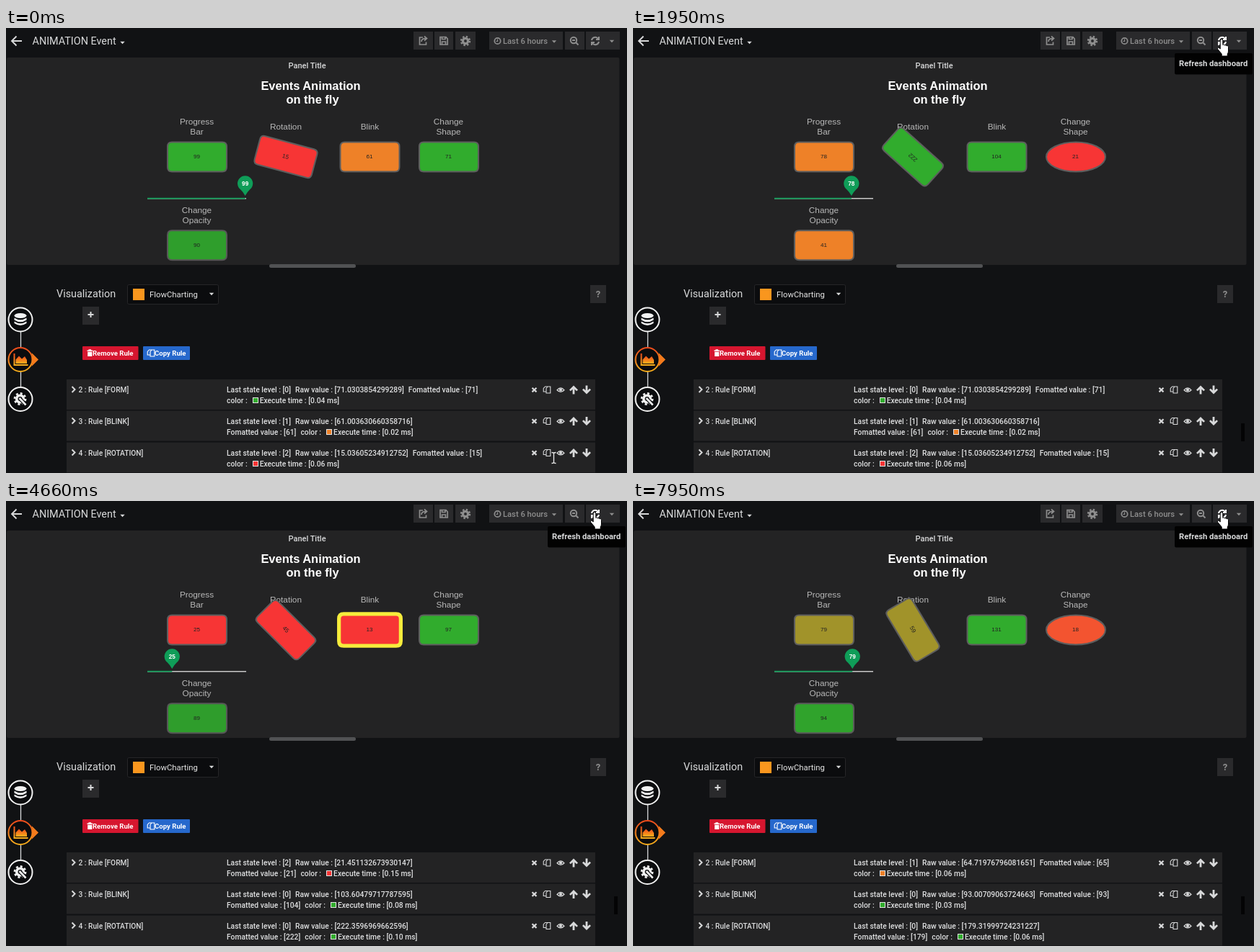
Write an HTML page that moves like this. It is 861 px wide and 618 px high and loops after 8 s.

```html
<!DOCTYPE html>
<html lang="en">
<head>
<meta charset="utf-8">
<title>Events animation</title>
<style>
html, body { margin: 0; width: 861px; height: 618px; overflow: hidden; background: #111214; }
svg { position: absolute; left: 0; top: 0; font-family: Roboto, sans-serif; fill: #d8d9da; }
.btn { fill: #2a2a2c; }
.dim { fill: #8e8e8e; }
.line { fill: none; stroke: #d8d9da; }
.dimline { fill: none; stroke: #8e8e8e; stroke-width: 1.7; }
.mid { text-anchor: middle; }
.flow { font-family: "Liberation Sans", Arial, sans-serif; text-anchor: middle; }
.shape { stroke: #5e5e5e; stroke-width: 2; stroke-linejoin: round; }
.info { position: absolute; left: 306px; font: 500 10.3px/15px Roboto, sans-serif; color: #dedfe0; white-space: pre; }
.info span { margin-right: 6px; }
.info i { display: inline-block; width: 6px; height: 6px; border: 1px solid #e4e4e4; margin: 0 2px 0 1px; }
</style>
</head>
<body>
<svg id="page" width="861" height="618">
  <defs>
    <linearGradient id="hot" x2="0" y2="1">
      <stop stop-color="#ec4a1c"/><stop offset="1" stop-color="#fbb01c"/>
    </linearGradient>
    <path id="refresh" d="M-5-1A5 5 0 0 1 4-3M5 1A5 5 0 0 1-4 3M5-6V-2H1M-5 6V2H-1" fill="none" stroke-width="2"/>
    <path id="caret" d="M-3.2-1.7H3.2L0 1.7z"/>
    <path id="up" d="M0-6 6 0 4.2 1.8 1.4-.8V6H-1.4V-.8L-4.2 1.8-6 0z"/>
    <path id="copy" d="M-1-2 1-4.5H4.800V4.500H-1zM-1 2.500H-4.800V-2L-2.500-4.500H1" fill="none" stroke-width="1.100"/>
    <g id="tools">
      <path class="line" d="M-3-2.7 3 2.9M3-2.7-3 2.9" stroke-width="2.2" transform="translate(732.5 0)"/>
      <use href="#copy" x="750" stroke="#d8d9da"/>
      <path class="line" d="M764 .3Q769-5.6 774 .3 769 5.6 764 .3z" stroke-width="1.3"/>
      <circle cx="769" r="2.1"/>
      <use href="#up" x="787"/>
      <use href="#up" transform="translate(805 0) scale(1 -1)"/>
    </g>
  </defs>

  <!-- top bar -->
  <path class="line" d="M22 18H9M14.5 11.5 8 18 14.5 24.5" stroke-width="1.9"/>
  <text x="36.5" y="23" font-size="14.4">ANIMATION Event</text>
  <use href="#caret" x="161.5" y="20.5"/>
  <path class="btn" d="M565 5h27v25h-27zM594 5h26v25h-26zM623 5h28v25h-28zM670 5h102v25h-102zM775 5h27v25h-27zM804 5h47v25h-47z"/>
  <path class="dimline" d="M578 13H573.5V23H582.500V19.500M576 19Q576 14.500 582 14.500M580 11.500 583.5 14.500 580 17.500M602 12.500H610L612.200 15V23H602zM604.500 12.500V15.500H609V12.500M604.500 23V19H609.500V23"/>
  <circle class="dimline" cx="637" cy="18" r="3.6" style="stroke-width:3.2"/>
  <circle class="dimline" cx="637" cy="18" r="6" style="stroke-width:2.4" stroke-dasharray="2.4 2.312"/>
  <circle class="dimline" cx="681.5" cy="18" r="4.2"/>
  <path class="dimline" d="M681.500 15.500V18.500H679.500" style="stroke-width:1.2"/>
  <text class="dim" x="689" y="22" font-size="11.2" font-weight="500">Last 6 hours</text>
  <use href="#caret" class="dim" x="760" y="19"/>
  <circle class="dimline" cx="787" cy="17" r="4.2" style="stroke-width:2"/>
  <path class="dimline" d="M785 17H789M790 20 793.500 23.500" style="stroke-width:2"/>
  <use href="#refresh" id="reload" x="817" y="18"/>
  <use href="#caret" class="dim" x="840" y="18.500"/>

  <!-- panel -->
  <rect x="1" y="41" width="849.500" height="288" rx="2" fill="#232324"/>
  <rect x="365" y="328" width="120" height="5" rx="2.500" fill="#515254"/>
  <text class="mid" x="417.500" y="56" font-size="11" font-weight="500">Panel Title</text>
  <g class="flow">
    <g font-size="16.450" font-weight="700" fill="#fff">
      <text x="422.500" y="86">Events Animation</text><text x="425" y="105">on the fly</text>
    </g>
    <g font-size="11.800" fill="#b8b8b8">
      <text x="264.500" y="133.500">Progress</text><text x="264.500" y="147.500">Bar</text>
      <text x="388" y="140.500">Rotation</text><text x="504.500" y="140.500">Blink</text>
      <text x="613.500" y="133.500">Change</text><text x="613.500" y="147.500">Shape</text>
      <text x="264.500" y="256.500">Change</text><text x="264.500" y="270.500">Opacity</text>
    </g>
    <g id="boxes" font-size="8.100"></g>
    <path d="M196 236.700H333" stroke="#c9c9c9" stroke-width="1.600"/>
    <path id="bar" stroke="#0f9d58" stroke-width="1.800"/>
    <g id="pin">
      <path d="M0 233Q-2.500 228-6.500 224.200A10.600 10.600 0 1 1 6.500 224.200Q2.500 228 0 233z" fill="#0f9d58"/>
      <text y="219" font-size="8.200" font-weight="700" fill="#fff"></text>
    </g>
  </g>

  <!-- editor -->
  <text x="70" y="374" font-size="14.400">Visualization</text>
  <rect x="168.500" y="356.500" width="126" height="27" rx="2" fill="#0b0c0e" stroke="#262628"/>
  <rect x="176" y="362" width="16" height="16" fill="#f9961e"/>
  <text x="199" y="374" font-size="11.300" fill="#e6e6e6">FlowCharting</text>
  <use href="#caret" x="285" y="369.500"/>
  <path class="btn" d="M810 357h22v25h-22zM106 387h23v25h-23z"/>
  <text class="mid dim" x="821" y="374" font-size="13" font-weight="700">?</text>
  <path class="line" d="M113.500 398H121.500M117.500 394V402" stroke-width="2"/>

  <path class="line" d="M20.500 422V443M20.500 478V498" stroke="#fff" stroke-width="1.300"/>
  <g fill="#0b0c0e" stroke="#f2f2f2" stroke-width="2">
    <circle cx="20" cy="405" r="16.500"/><circle cx="20" cy="515.500" r="16.500"/>
    <circle cx="20" cy="460.500" r="16.500" stroke="url(#hot)"/>
  </g>
  <path d="M35.500 451 45 460.500 35.500 470Q38 460.500 35.500 451z" fill="#f47b1c"/>
  <g fill="#f2f2f2">
    <ellipse cx="20" cy="399.500" rx="8.500" ry="3.500"/>
    <path d="M11.500 402.500Q20 408 28.500 402.500V405.500Q20 411 11.500 405.500zM11.500 407.500Q20 413 28.500 407.500V410Q20 416 11.500 410z"/>
  </g>
  <path d="M11.500 452V468H30.500" fill="none" stroke="url(#hot)" stroke-width="2"/>
  <path d="M13.500 466V460.500L18 455.500 22 459.500 26 456 29 461V466z" fill="url(#hot)"/>
  <g fill="none" stroke="#f2f2f2">
    <circle cx="19.500" cy="515" r="4.800" stroke-width="3.600"/>
    <circle cx="19.500" cy="515" r="7.600" stroke-width="2.600" stroke-dasharray="3 2.969"/>
    <path d="M19.500 515 27.500 523.500" stroke="#0b0c0e" stroke-width="5"/>
    <path d="M18.500 514 27.500 523.500" stroke-width="2.600"/>
  </g>

  <rect x="106" y="442" width="77.500" height="19" rx="1" fill="#d6162f"/>
  <rect x="190" y="442" width="65" height="19" rx="1" fill="#2668cc"/>
  <g fill="#fff" font-size="9.600" font-weight="700">
    <path d="M112.500 447.500H120V449H112.500zM114.500 446.300H118V447.500H114.500zM113.200 449.800H119.300V456H113.200z"/>
    <text x="120" y="455">Remove Rule</text>
    <use href="#copy" x="201" y="451.500" stroke="#fff"/>
    <text x="206" y="455">Copy Rule</text>
  </g>
  <g id="rows" font-size="10.200" font-weight="500"></g>
  <rect id="thumb" x="843" y="549" width="5" height="25" fill="#040405"/>
</svg>
<div id="table"></div>

<svg width="861" height="618">
  <g id="tip">
    <rect x="751" y="35" width="108" height="29.500" rx="2" fill="#020202"/>
    <text x="757" y="53" font-size="11.200" font-weight="700">Refresh dashboard</text>
  </g>
  <g id="cursor" stroke="#000" fill="#fff">
    <path d="M-3-7.500Q0-7.500 0-6 0-7.500 3-7.500M0-6V6M-3 7.500Q0 7.500 0 6 0 7.500 3 7.500" fill="none" stroke="#eee" stroke-width="1.300"/>
    <path d="M0 0V16L3.700 12.500 6 18 8.500 17 6.200 11.700H11.300z"/>
    <path d="M-1.800 14V2.200a1.800 1.800 0 0 1 3.600 0V8.500a1.600 1.600 0 0 1 2.700.6 1.600 1.600 0 0 1 2.600.8 1.500 1.500 0 0 1 2.400 1.300V17q0 2.500-1.300 4v3H.2v-3L-5.300 14.500q-.8-1.600.6-2.200 1.400-.2 2.900 1.700z"/>
  </g>
</svg>

<script>
const LOOP = 8000;
const $ = id => document.getElementById(id);
const colors = [[49, 172, 45], [238, 129, 40], [247, 53, 53]]; // by state level
const rgb = c => `rgb(${c.map(Math.round)})`;

// Values and levels: progress, rotation, blink, shape, opacity
const states = [
  { at: 0, values: [99, 15, 61, 71, 90], levels: [0, 2, 1, 0, 0], opacity: .9 },
  { at: 1400, values: [78, 222, 104, 21, 41], levels: [1, 0, 0, 2, 1], opacity: 1 },
  { at: 2820, values: [25, 45, 13, 97, 89], levels: [2, 2, 2, 0, 0], opacity: .89 },
  { at: 5640, values: [103, 179, 93, 65, 90], levels: [0, 0, 0, 1, 0], opacity: .9 },
  { at: 7750, values: [79, 59, 131, 18, 94], levels: [1, 1, 0, 2, 0], opacity: .94 }
];

// Level, raw value and execute time of each rule
const logs = [
  [[0, '71.0303854299289', '0.04'], [1, '61.003630660358716', '0.02'], [2, '15.03605234912752', '0.06']],
  [[2, '21.451132673930147', '0.15'], [0, '103.60479717787595', '0.08'], [0, '222.3596969662596', '0.10']],
  [[0, '97.47648664684687', '0.02'], [2, '13.187241143230382', '0.03'], [2, '45.08254817600146', '0.06']],
  [[1, '64.71976796081651', '0.06'], [0, '93.00709063724663', '0.03'], [0, '179.31999724231227', '0.06']]
];

// Time, x, y, pointer kind (0 text, 1 arrow, 2 hand)
const moves = [
  [0, 759.5, 597, 0], [100, 772, 592, 1], [210, 805, 572, 1], [320, 838, 500, 1], [430, 843, 300, 1],
  [540, 838, 120, 1], [640, 811, 26.5, 2], [760, 813, 22, 2], [860, 814.5, 18, 2], [970, 815.5, 16, 2],
  [1950, 816, 15, 2]
];

// Outlines by level: rectangle, triangle, ellipse
const outlines = [
  'M-34.800-20.500H34.800Q41-20.500 41-14.300V14.300Q41 20.500 34.800 20.500H-34.800Q-41 20.500-41 14.300V-14.300Q-41-20.500-34.800-20.500z',
  'M-41-17Q-41-20-38-19L36-1.500Q41 0 36 1.500L-38 19Q-41 20-41 17z',
  'M-41 0A41 20.500 0 0 1 41 0 41 20.500 0 0 1-41 0z'
];

const places = [[265, 179], [388, 179], [504.5, 179], [614, 179], [265, 301.8]];
$('boxes').innerHTML = places.map(([x, y]) =>
  `<g transform="translate(${x} ${y})"><g><path class="shape" d="${outlines[0]}"/><text x="-.500" y="2.200" fill="#222"></text></g></g>`).join('');
const boxes = [...$('boxes').children].map(g => g.firstChild);

const tops = [488, 531.5, 575.5];
$('rows').innerHTML = ['FORM', 'BLINK', 'ROTATION'].map((name, i) => `<g transform="translate(0 ${tops[i]})">
  <rect x="84" width="733" height="42" fill="#232324"/>
  <path class="line" d="M91.500 10 95.500 14 91.500 18" stroke-width="2"/>
  <text x="100.500" y="18">${i + 2} : Rule [${name}]</text><use href="#tools" y="14.500"/></g>`).join('');

function logLine([level, raw, time], i) {
  const value = String(Math.round(raw));
  const wrap = raw.length + value.length > 19;
  const formatted = `<span>Fomatted value : [${value}]</span>`;
  return `<div class="info" style="top:${tops[i] + 7}px"><span>Last state level : [${level}]</span>` +
    `<span>Raw value : [${raw}]</span>${wrap ? '\n' + formatted : formatted + '\n'}` +
    `<span>color :</span><i style="background:${rgb(colors[level])}"></i>Execute time : [${time} ms]</div>`;
}

// Colours change in four hard steps
const mixAt = age => age < 85 ? .2 : age < 195 ? .41 : age < 300 ? .59 : 1;

let shownLog = -1;

function draw(t) {
  const n = states.findLastIndex(s => t >= s.at);
  const now = states[n], old = states[Math.max(n - 1, 0)];
  const blink = t >= 3790 && t < 4220 || t >= 4660 && t < 5090;

  boxes.forEach((box, i) => {
    const from = colors[old.levels[i]], to = colors[now.levels[i]];
    const mix = mixAt(t - now.at - 2 * i); // boxes repaint one after another
    box.firstChild.style.fill = rgb(to.map((c, k) => from[k] + (c - from[k]) * mix));
    box.lastChild.textContent = now.values[i];
  });
  boxes[1].setAttribute('transform', `rotate(${now.values[1]})`);
  const blinkBox = boxes[2].firstChild;
  blinkBox.style.stroke = blink ? '#f6ec3c' : '';
  blinkBox.style.strokeWidth = blink ? 5 : '';
  blinkBox.setAttribute('transform', blink ? 'scale(1.045 1.080)' : '');
  boxes[3].firstChild.setAttribute('d', outlines[now.levels[3]]);
  boxes[4].setAttribute('opacity', now.opacity);

  const percent = Math.min(100, now.values[0]), x = 196 + 1.37 * percent;
  $('bar').setAttribute('d', `M196 236.700H${x}`);
  $('pin').setAttribute('transform', `translate(${x})`);
  $('pin').lastElementChild.textContent = percent;

  const log = Math.max(0, n - 1); // the table lags one refresh behind
  if (log !== shownLog) {
    $('table').innerHTML = logs[log].map(logLine).join('');
    shownLog = log;
  }

  const [, cx, cy, kind] = moves.findLast(m => t >= m[0]);
  $('cursor').setAttribute('transform', `translate(${cx} ${cy})`);
  [...$('cursor').children].forEach((c, i) => c.style.display = i === kind ? '' : 'none');
  $('reload').style.stroke = kind === 2 ? '#fff' : '#8e8e8e';
  $('thumb').setAttribute('opacity', t < 320 ? 0 : 1);
  $('tip').setAttribute('opacity', t < 640 ? 0 : t < 760 ? .3 : t < 860 ? .7 : t < 970 ? .95 : 1);
}

const start = performance.now();
function tick() {
  draw((performance.now() - start) % LOOP);
  requestAnimationFrame(tick);
}
tick();
</script>
</body>
</html>
```
